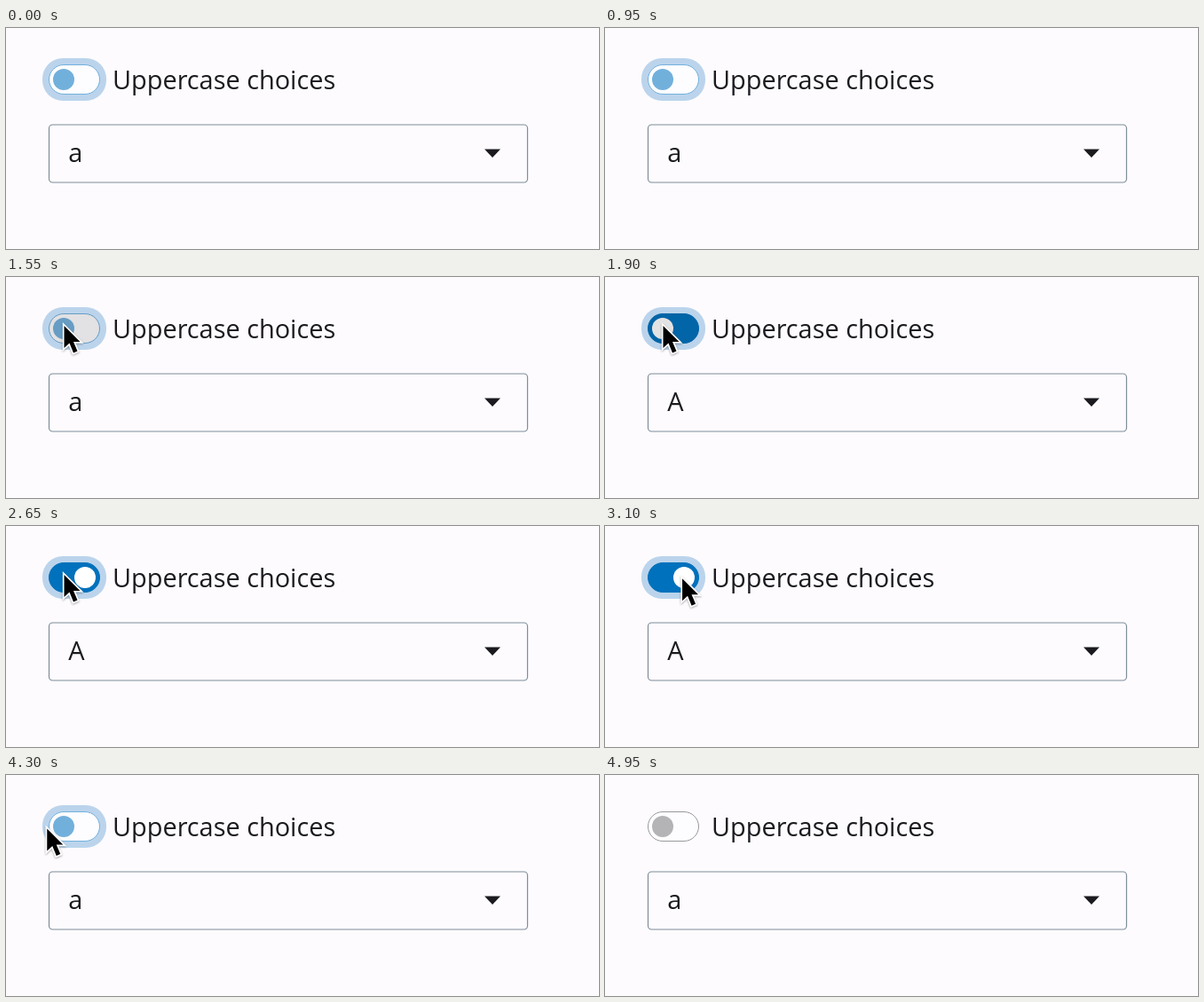
These frames come from a looping animation (668x249 px, 6300 ms). An HTML page:

```html
<!DOCTYPE html>
<html lang="en">
<head>
<meta charset="utf-8">
<title>Uppercase choices</title>
<style>
  html, body { margin: 0; width: 100%; height: 100%; overflow: hidden; background: #fdfbfe; }
  svg { display: block; }
  text { font: 28.9px "Open Sans", "Noto Sans", sans-serif; fill: #1b1b1f; }
</style>
</head>
<body>
<svg width="668" height="249">
  <rect id="ring" x="41" y="34" width="72" height="48" rx="23" fill="#bbd4ec"/>
  <rect id="track" x="48.5" y="41.5" width="57" height="33" rx="16.5"/>
  <circle id="knob" cy="58" r="12"/>
  <rect id="shade" x="48" y="41" width="58" height="34" rx="17" fill="#100800"/>
  <text x="120" y="69">Uppercase choices</text>

  <rect x="48.5" y="109" width="539" height="65" rx="4" fill="none" stroke="#7f8e99" stroke-width="1.2"/>
  <text id="choice" x="70.2" y="151"></text>
  <path d="M539 136.5h18l-9 9.5z" fill="#1b1b1f"/>

  <path id="cursor" d="M0 0V25L6 19.5L10.5 30.5L15 28.5L10.5 18H18Z"
        stroke="#fff" stroke-width="3.4" paint-order="stroke"
        style="filter: drop-shadow(0 1px 1px #0005)"/>
</svg>
<script>
const LOOP = 6300, STEP = 50;
const ENTER = 950, TURN_ON = 1900, SHIFT = 2650, TURN_OFF = 3700, LEAVE = 4200, BLUR = 4750;
const SLIDE = 300, SHADE = .11;

const $ = id => document.getElementById(id);
const set = (id, attrs) => {
  for (const name in attrs) $(id).setAttribute(name, attrs[name]);
};
const progress = (t, start, length) => Math.min(1, Math.max(0, (t - start) / length));
const smooth = (t, start, length) => {
  const p = progress(t, start, length);
  return p * p * (3 - 2 * p);
};
const easeOut = (t, start, length) => 1 - (1 - progress(t, start, length)) ** 2;

function draw(now) {
  const t = Math.floor(now % LOOP / STEP) * STEP;
  const on = t >= TURN_ON && t < TURN_OFF;
  const focused = t < BLUR;
  const accent = focused ? '#72b0dc' : '#b4b3b5';

  const enter = easeOut(t, ENTER, 490);
  const shift = easeOut(t, SHIFT, 600);
  const leave = smooth(t, LEAVE, 250);
  const x = -28 + 93.5 * enter + 23 * shift - 120 * leave;
  const y = 58 - 3 * enter + 4.5 * shift + 3 * leave;

  const slide = smooth(t, TURN_ON, SLIDE) - smooth(t, TURN_OFF, SLIDE);
  const pressed = smooth(t, TURN_ON - 500, 150) - smooth(t, TURN_ON + SLIDE, 300)
                + smooth(t, TURN_OFF - 400, 150) - smooth(t, TURN_OFF - 50, 100);

  set('ring', { opacity: 1 - smooth(t, BLUR - 50, 100) });
  set('track', {
    fill: on ? '#0071bc' : '#fdfdff',
    stroke: on ? '#0071bc' : focused ? accent : '#98989b'
  });
  set('knob', { cx: 65 + 24 * slide, fill: on ? '#fff' : accent });
  set('shade', { opacity: SHADE * pressed });
  set('cursor', { transform: `translate(${x} ${y})` });
  $('choice').textContent = on ? 'A' : 'a';
  requestAnimationFrame(draw);
}
draw(0);
</script>
</body>
</html>
```
